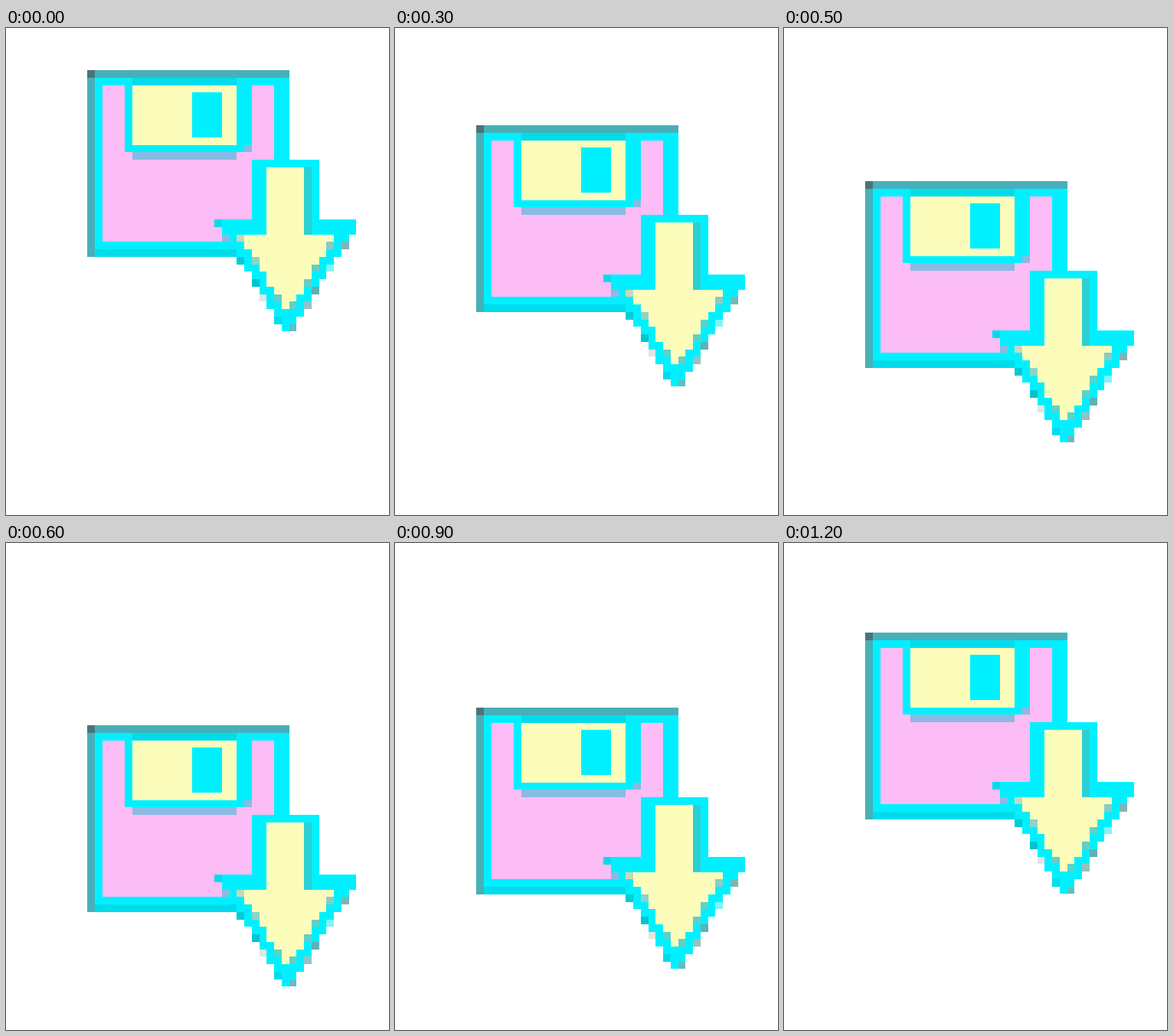
An HTML page with a canvas that plays this animation: 500 by 636 pixels, repeating every 1.3 s.

```html
<!DOCTYPE html>
<html lang="en">
<head>
<meta charset="utf-8">
<title>Save icon</title>
<style>
html, body { margin: 0; width: 100%; height: 100%; overflow: hidden; background: #fff; }
canvas { display: block; }
</style>
</head>
<body>
<canvas id="stage" width="500" height="636"></canvas>
<script>
const ctx = document.getElementById('stage').getContext('2d');
const CELL = 9.75, LEFT = 106.3, TOP = 55.2, STEP = 100;

const CYAN = '#00f0ff', DEEP = '#00dcec', EDGE = '#47b0b7', PINK = '#fcbcf5';
const CREAM = '#fcfcbb', SHADE = '#88bbe4', TEAL = '#60d0c8', SIDE = '#2cd0d5';

// vertical offset for each step of the bounce
const down = [0, 18, 37, 72, 108, 145, 183];
const up = [224, 192, 160, 127, 95, 62];
const drops = [...down, ...up];

const px = i => Math.round(LEFT + i * CELL);
const py = j => Math.round(TOP + j * CELL);

// fills grid cells from (x1, y1) up to (x2, y2)
function box(color, x1, y1, x2 = x1 + 1, y2 = y1 + 1) {
  ctx.fillStyle = color;
  ctx.fillRect(px(x1), py(y1), px(x2) - px(x1), py(y2) - py(y1));
}

function row(y, left, fill, right, end) {
  box(CYAN, left, y, end);
  if (right > fill) box(CREAM, fill, y, right);
}

function disk() {
  box(CYAN, 0, 0, 27, 25);
  box(EDGE, 0, 0, 27, 1);
  box(EDGE, 0, 0, 1, 25);
  box('#4b7478', 0, 0);
  box(DEEP, 1, 24, 20, 25);
  box(PINK, 2, 2, 25, 23);
  box(CYAN, 5, 1, 22, 11);
  box(DEEP, 6, 1, 20, 2);
  box(CREAM, 6, 2, 20, 10);
  box(CYAN, 14, 3, 18, 9);
  box('#8fb8e0', 21, 10);
  box(SHADE, 6, 11, 20, 12);
}

function arrow() {
  box(CYAN, 22, 12, 31, 20);
  box(CYAN, 17, 20, 36, 21);
  box(DEEP, 17, 20);
  box(CYAN, 18, 21, 36, 22);

  row(22, 19, 21, 33, 35);
  row(23, 19, 21, 32, 34);
  row(24, 20, 22, 32, 34);
  row(25, 21, 22, 31, 33);
  row(26, 21, 23, 31, 32);
  row(27, 22, 24, 30, 32);
  row(28, 23, 24, 30, 31);
  row(29, 23, 25, 29, 30);
  row(30, 24, 25, 28, 30);
  row(31, 24, 26, 28, 29);
  row(32, 25, 0, 0, 29);
  row(33, 26, 0, 0, 28);
  row(34, 26, 0, 0, 27);

  box(CREAM, 24, 13, 29, 22);
  box(SIDE, 29, 13, 30, 22);

  // softened cells along the stairs
  box(SHADE, 18, 22);
  box('#c8d8b8', 20, 22);
  box('#00ccd8', 20, 25);
  box('#8cd4c8', 22, 25);
  box('#00c4d0', 22, 28);
  box('#e4e4e4', 23, 30);
  box(TEAL, 25, 30);
  box(DEEP, 25, 33);
  box('#88ccc8', 32, 23);
  box('#80b4b8', 34, 23);
  box(TEAL, 30, 26);
  box('#80f4f8', 32, 26);
  box(TEAL, 29, 28);
  box('#60b0b4', 30, 29);
  box(TEAL, 27, 31);
  box('#98c0c4', 29, 31);
  box('#60c0c4', 27, 34);
}

function draw(ms) {
  const i = Math.floor(ms / STEP) % drops.length;
  ctx.setTransform(1, 0, 0, 1, 0, 0);
  ctx.fillStyle = '#fff';
  ctx.fillRect(0, 0, 500, 636);
  ctx.translate(0, drops[i]);
  disk();
  box('#fff', 27, 0, 36, 12);
  arrow();
}

const start = performance.now();
function tick() {
  draw(performance.now() - start);
  requestAnimationFrame(tick);
}
tick();
</script>
</body>
</html>
```
